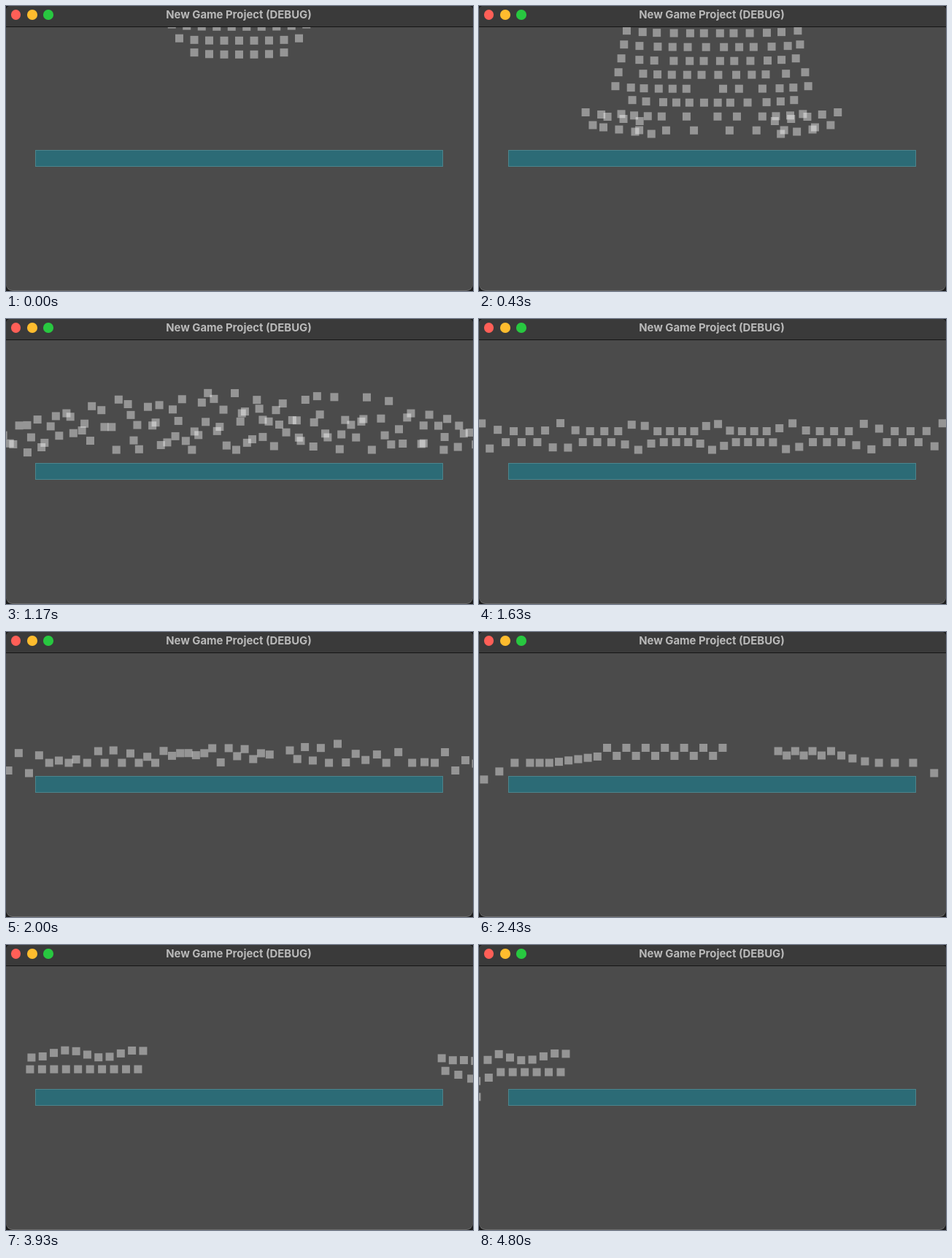
Write an HTML page with a canvas that moves like this. It is 640 px wide and 390 px high and loops after 4.83 s.

```html
<!DOCTYPE html>
<html lang="en">
<head>
<meta charset="utf-8">
<title>Falling squares</title>
<style>
  html, body { margin: 0; width: 100%; height: 100%; overflow: hidden; background: #1b1b1b; }
  .window {
    position: relative; width: 640px; height: 390px; overflow: hidden;
    border-radius: 6px 6px 9px 9px; background: #4b4b4b;
  }
  .window::after {
    content: ""; position: absolute; inset: 0; border-radius: inherit;
    box-shadow: inset 0 -1px #6c6c6c;
  }
  .bar {
    position: absolute; inset: 0 0 auto; height: 28px; z-index: 1;
    background: #3a3a3a; border-bottom: 1px solid #151515;
  }
  .bar i { position: absolute; top: 5.3px; width: 13.5px; height: 13.5px; border-radius: 50%; }
  .bar b {
    position: absolute; left: 0; width: 638px; top: 2px; text-align: center;
    font: 700 14.87px/20px Inter, Roboto, sans-serif; color: #b9b9b9; white-space: nowrap;
  }
  .plate {
    position: absolute; left: 40px; top: 197px; width: 557px; height: 21px;
    background: #2c6b76; border: 1px solid #4c848c;
  }
  canvas { position: absolute; left: 0; top: 0; }
</style>
</head>
<body>
<div class="window">
  <div class="plate"></div>
  <canvas id="stage" width="640" height="390"></canvas>
  <div class="bar">
    <i style="left:6.5px;background:#ff5f57"></i>
    <i style="left:29px;background:#febc2e"></i>
    <i style="left:51.3px;background:#28c840"></i>
    <b>New Game Project (DEBUG)</b>
  </div>
</div>
<script>
const LOOP = 4830, SIZE = 11, LAYER = 67;
// Disc, heap, thin layer, split, clusters, drift, end
const TIMES = [0, 770, 1630, 2430, 3030, 3930, 4800];
const ctx = document.getElementById('stage').getContext('2d');
const clamp = v => Math.max(0, Math.min(1, v));

let seed = 7;
function rand(r) {
  seed = (seed * 16807) % 2147483647;
  return (seed / 2147483647 * 2 - 1) * r;
}

// Parabolic heap in staggered columns, with squares thrown clear on both sides
function heap() {
  const out = [];
  const add = (x, y, depth) => out.push({ depth, keys: [null, [x, y]] });
  for (let c = -14; c <= 14; c++) {
    const d = c * 14, top = 33 + 125 * (d / 205) ** 2;
    for (let k = 0; ; k++) {
      const y = top + 27 * (k && c % 2 ? k + 0.5 : k);
      if (y > 178) break;
      const py = Math.min(177, y + rand(2));
      add(318 + d + rand(3), py, py);
    }
  }
  for (let i = 0; i < 10; i++) {
    const y = 167 - 1.5 * i + (i % 2 ? -8 : 8);
    for (const side of [-1, 1]) add(318 + side * (203 + 11 * i), y, y + 300);
  }
  return out;
}

// Falling disc: its lowest rows become the deepest part of the heap
function addDisc(squares) {
  const queue = [...squares].sort((a, b) => b.depth - a.depth);
  for (let j = 0; queue.length; j++) {
    const n = Math.max(4, Math.round(12.3 * Math.sqrt(Math.max(0, 1 - ((j - 6.7) / 8) ** 2))));
    const row = queue.splice(0, n).sort((a, b) => a.keys[1][0] - b.keys[1][0]);
    row.forEach((s, i) => {
      const u = i - (row.length - 1) / 2;
      const lift = 5 * (2 * u / n) ** 4;
      s.keys[0] = [319.5 + u * 20.5, 66 - 19 * j - lift];
    });
  }
}

// Two loose rows that swell in regular bumps
function layer(i) {
  const x = 4 + 9.56 * i + 15 * Math.sin(2 * Math.PI * i / 66);
  const bump = Math.max(0, Math.cos(2 * Math.PI * (x - 112) / 105)) ** 2;
  return [x, 161 + (i % 2 ? 1 : -1) * (7.5 + 11 * bump)];
}

// Square i of n in a drifting two-row cluster
function cluster(i, n, x0, width) {
  const low = i % 2, slots = (low ? Math.floor(n / 2) : Math.ceil(n / 2)) - 1;
  const x = x0 + 5 * low + (width - 5 * low) * Math.floor(i / 2) / slots;
  const wave = 5 * Math.cos(2 * Math.PI * (x - x0 - 50) / 94);
  return [x, low ? 167 : 146 - wave];
}

function leftPath(i) {
  if (i < 0) return [[70 + i * 21, 182 + 2.2 * i * i], [10 + i * 21, 232 - i * 8]];
  const [x, y] = cluster(i, 21, 94, 153);
  const late = x - 59 - (i % 2) * 7, end = late - 69;
  const over = Math.max(0, 28 - end);
  return [
    [70 + 13.2 * i, i < 8 ? 183 - 1.8 * i : 164 + (i % 2 ? 5.5 : -5.5)],
    [x, y], [late, y + 3], [end, y + 7 + 0.035 * over * over]
  ];
}

function rightPath(i) {
  const split = [410 + 11.6 * i + 0.0022 * i ** 4, i < 8 ? 163 + 6 * (i % 2) : 173 + 4 * (i - 8)];
  if (i > 10) return [split, [split[0] + 65, 240]];
  const [x, y] = cluster(i, 11, 494, 76), late = x + 103;
  return [split, [x, y], [late, y + 4 + 0.3 * Math.max(0, late - 598)], [late + 135, 205]];
}

// The layer parts at square 40; its outer ends run off the plate
function flow(i) {
  const p = layer(i);
  if (i < 0 || i >= LAYER) return [p];
  if (i < 16) return [p, [p[0] - 167 - (16 - i) * 8, 198]];
  if (i > 53) return [p, [p[0] + 140 + (i - 53) * 8, 198]];
  return [p, ...(i < 40 ? leftPath(i - 19) : rightPath(i - 40))];
}

const squares = heap();
addDisc(squares);
squares.sort((a, b) => a.keys[1][0] - b.keys[1][0]);
const spare = Math.round((squares.length - LAYER) / 2);
squares.forEach((s, r) => s.keys.push(...flow(r - spare)));

// Drop at a steady speed, then slide outwards
function fall([from, to], t) {
  const land = Math.min(TIMES[1], (to[1] - from[1]) / 0.33), start = land * 0.6;
  const s = clamp((t - start) / (TIMES[1] - start));
  return [from[0] + (to[0] - from[0]) * s, from[1] + (to[1] - from[1]) * clamp(t / land)];
}

function slope(keys, i, axis) {
  const a = Math.max(0, i - 1), b = Math.min(keys.length - 1, i + 1);
  return (keys[b][axis] - keys[a][axis]) / (TIMES[b] - TIMES[a]);
}

// Cubic Hermite curve between two keys
function glide(keys, i, t, axis) {
  const d = TIMES[i + 1] - TIMES[i], u = (t - TIMES[i]) / d, v = 1 - u;
  return keys[i][axis] * v * v * (1 + 2 * u) + keys[i + 1][axis] * u * u * (3 - 2 * u)
    + d * u * v * (v * slope(keys, i, axis) - u * slope(keys, i + 1, axis));
}

function place(keys, t) {
  if (t < TIMES[1]) return fall(keys, t);
  let i = 1;
  while (i < TIMES.length - 2 && t >= TIMES[i + 1]) i++;
  if (i + 1 >= keys.length) return null;
  const x = glide(keys, i, t, 0), y = glide(keys, i, t, 1);
  return [x, x > 36 && x < 602 ? Math.min(y, 179) : y];
}

function draw(t) {
  ctx.clearRect(0, 0, 640, 390);
  ctx.fillStyle = 'rgba(255,255,255,.41)';
  for (const { keys } of squares) {
    const p = place(keys, t);
    if (p) ctx.fillRect(p[0] - SIZE / 2, p[1] - SIZE / 2, SIZE, SIZE);
  }
}

const begin = performance.now();
function tick() {
  const t = (performance.now() - begin) % LOOP;
  draw(Math.min(t, TIMES[6]));
  requestAnimationFrame(tick);
}
tick();
</script>
</body>
</html>
```
